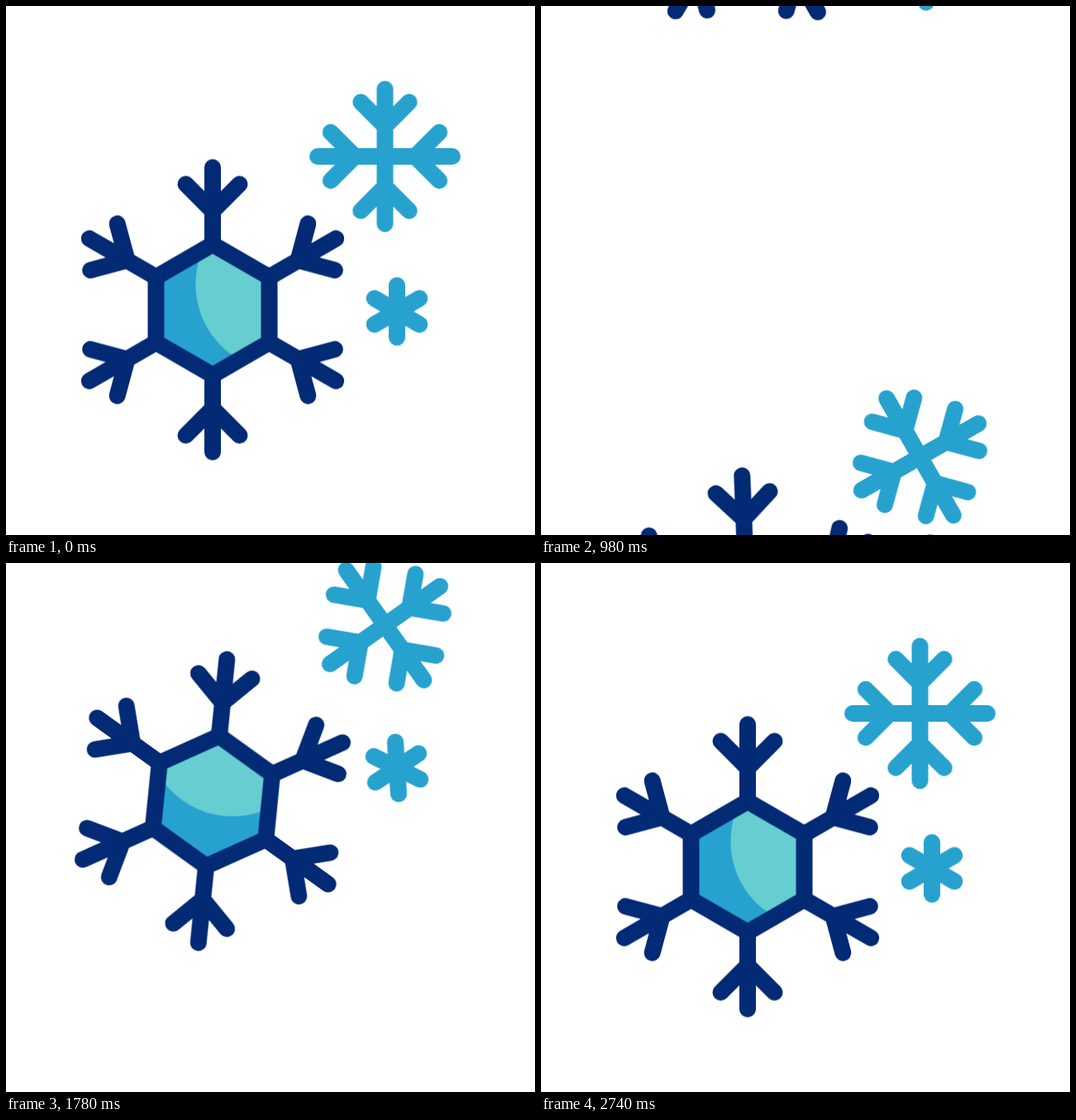
These frames come from a looping animation (640 by 640 pixels, 3.22 s). An HTML page:

```html
<!DOCTYPE html>
<html lang="en">
<head>
<meta charset="utf-8">
<title>Snowflakes</title>
<style>
  html, body { margin: 0; width: 100%; height: 100%; overflow: hidden; background: #fff; }
  svg { display: block; width: 100%; height: 100%; }
</style>
</head>
<body>
<svg id="stage" viewBox="0 0 640 640"></svg>
<script>
const LOOP = 3220;
const EASE = 'cubic-bezier(.4, 0, .6, 1)';
const NAVY = '#022a75', BLUE = '#27a2cf', TEAL = '#66cdd1';
const stage = document.getElementById('stage');

function add(parent, tag, attrs = {}) {
  const node = document.createElementNS('http://www.w3.org/2000/svg', tag);
  for (const key in attrs) node.setAttribute(key, attrs[key]);
  parent.append(node);
  return node;
}

// Repeats one upward arm around the centre.
function arms(parent, count, path, color) {
  for (let i = 0; i < count; i++) {
    add(parent, 'path', {
      d: path, transform: `rotate(${i * 360 / count})`, fill: 'none',
      stroke: color, 'stroke-width': 20, 'stroke-linecap': 'round'
    });
  }
}

const hexagon = Array.from({ length: 6 }, (_, i) => {
  const a = i * Math.PI / 3;
  return [79.1 * Math.sin(a), -79.1 * Math.cos(a)].map(v => v.toFixed(2)).join();
}).join(' ');

const clip = add(add(stage, 'defs'), 'clipPath', { id: 'hex' });
add(clip, 'polygon', { points: hexagon });

function drawLarge(g) {
  add(g, 'polygon', { points: hexagon, fill: BLUE });
  const shine = add(g, 'g', { 'clip-path': 'url(#hex)' });
  add(shine, 'circle', { cx: 84.4, cy: -30.8, r: 105, fill: TEAL });
  arms(g, 6, 'M0-82V-172.3M-32.5-152L0-119.5L32.5-152', NAVY);
  add(g, 'polygon', { points: hexagon, fill: 'none', stroke: NAVY, 'stroke-width': 20 });
}

function drawMedium(g) {
  arms(g, 4, 'M0 0V-81.5M-29.2-65.7L0-36.5L29.2-65.7', BLUE);
}

function drawSmall(g) {
  arms(g, 6, 'M0 0V-31.5', BLUE);
}

// steps: [time, value] pairs, eased between neighbours and held at both ends
function play(node, steps, toTransform) {
  const all = [[0, steps[0][1]], ...steps, [LOOP, steps[steps.length - 1][1]]];
  node.animate(
    all.map(([time, value]) => ({ offset: time / LOOP, transform: toTransform(value), easing: EASE })),
    { duration: LOOP, iterations: Infinity }
  );
}

function flake(draw, x, y, fall, spin) {
  const mover = add(stage, 'g');
  const spinner = add(mover, 'g');
  draw(spinner);
  play(mover, fall, dy => `translate(${x}px, ${y + dy}px)`);
  play(spinner, spin, deg => `rotate(${deg}deg)`);
}

// Each flake has one copy that leaves at the bottom and one that arrives from the top.
const flakes = [
  { draw: drawLarge, x: 250, y: 367.5,
    out: [[0, 0], [1480, 493]], outSpin: [[0, 0], [810, -66], [1860, 0]],
    in: [[680, -560], [2160, 0]], inSpin: [[514, 0], [1497, -64.5], [2545, 0]] },
  { draw: drawMedium, x: 458.5, y: 182,
    out: [[0, 0], [1680, 570]], outSpin: [[0, 0], [762, 64.7], [1992, 0]],
    in: [[970, -285], [2378, 0]], inSpin: [[1097, 0], [1408, 66], [2738, 0]] },
  { draw: drawSmall, x: 473, y: 369.5,
    out: [[0, 0], [1440, 398]], outSpin: [[0, 0], [702, 64.8], [1802, 0]],
    in: [[734, -425], [2387, 0]], inSpin: [[748, 0], [1514, 64.5], [2619, 0]] }
];

for (const f of flakes) {
  flake(f.draw, f.x, f.y, f.out, f.outSpin);
  flake(f.draw, f.x, f.y, f.in, f.inSpin);
}
</script>
</body>
</html>
```
